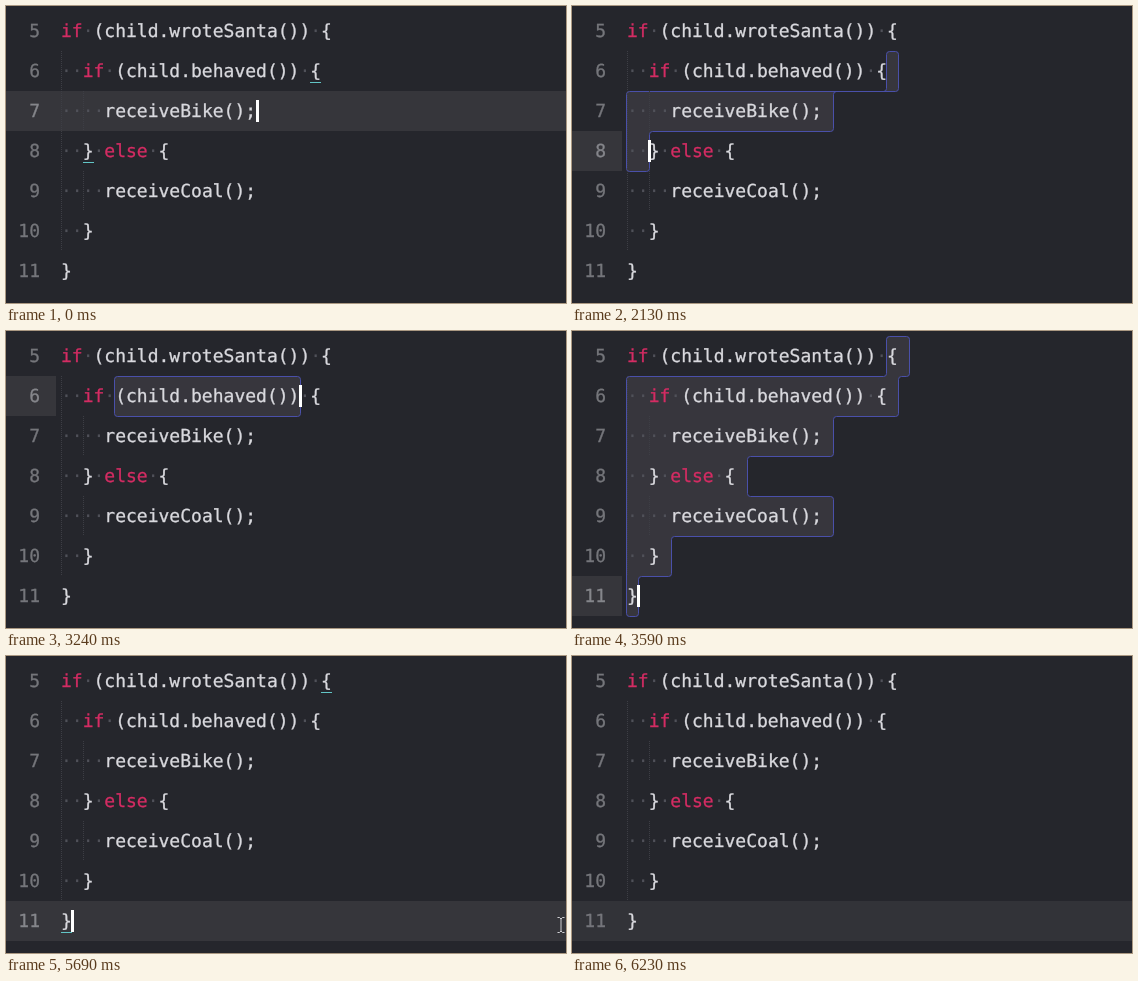
An HTML page that plays this animation: 560 by 297 pixels, repeating every 6270 ms.

```html
<!DOCTYPE html>
<html lang="en">
<head>
<meta charset="utf-8">
<title>Bracket selection</title>
<style>
  html, body { margin: 0; width: 100%; height: 100%; overflow: hidden; background: #25262c; }
  svg { display: block; width: 560px; height: 297px; }
  text {
    font: 18px "DejaVu Sans Mono", monospace;
    text-rendering: geometricPrecision;
    white-space: pre;
    stroke-width: .3px;
  }
  .code { fill: #d9d9de; stroke: #d9d9de; }
  .key { fill: #d42c63; stroke: #d42c63; }
  .dot { fill: #505159; }
  .num { fill: #75767b; stroke: #75767b; }
  .num.on { fill: #85868b; stroke: #85868b; }
  .guide { stroke: #3d3e45; stroke-dasharray: 1 1; }
  .sel { fill: #37363d; stroke: #4a50aa; }
  .line { fill: #36363b; }
  .mark { fill: #62c5c6; }
  .caret { fill: #fff; }
  .beam { fill: none; stroke: #d0d0d4; }
</style>
</head>
<body>
<svg id="stage" viewBox="0 0 560 297"></svg>
<script>
const LOOP = 6270, FIRST = 5, LEFT = 55, TOP = 5, ROW = 40, CHAR = 10.836;
const lines = [
  'if (child.wroteSanta()) {',
  '  if (child.behaved()) {',
  '    receiveBike();',
  '  } else {',
  '    receiveCoal();',
  '  }',
  '}'
];

// Positions are [line number, column]; sel runs from one position to another.
const states = [
  { at: 0, line: 7, wide: true, caret: [7, 18], marks: [[6, 23], [8, 2]] },
  { at: 2130, line: 8, caret: [8, 2], sel: [[6, 24], [8, 2]] },
  { at: 2730, line: 8, caret: [8, 3], sel: [[6, 23], [8, 3]] },
  { at: 3240, line: 6, caret: [6, 22], sel: [[6, 5], [6, 22]] },
  { at: 3590, line: 11, caret: [11, 1], sel: [[5, 24], [11, 1]] },
  { at: 4910, line: 11, wide: true, caret: [11, 1], marks: [[5, 24], [11, 0]] },
  { at: 5690, line: 11, wide: true, caret: [11, 1], marks: [[5, 24], [11, 0]], beam: true },
  { at: 5750, line: 11, wide: true, caret: [11, 1], marks: [[5, 24], [11, 0]] },
  { at: 6230, line: 11, wide: true, idle: true }
];

const stage = document.getElementById('stage');
const colX = c => LEFT + c * CHAR;
const rowY = n => TOP + (n - FIRST) * ROW;

function add(parent, tag, attrs, text) {
  const el = document.createElementNS('http://www.w3.org/2000/svg', tag);
  for (const k in attrs) el.setAttribute(k, attrs[k]);
  if (text) el.textContent = text;
  return parent.appendChild(el);
}
const rect = (parent, cls, x, y, width, height) =>
  add(parent, 'rect', { class: cls, x, y, width, height });

const back = add(stage, 'g', {});
const text = add(stage, 'g', {});
const front = add(stage, 'g', {});

function guide(x, from, to) {
  add(text, 'path', { class: 'guide', d: `M${x} ${rowY(from)}V${rowY(to)}` });
}
guide(55.5, 6, 11);
guide(77.5, 7, 8);
guide(77.5, 9, 10);

const numbers = lines.map((src, i) => {
  const n = FIRST + i, y = rowY(n) + 26;
  for (const m of src.matchAll(/ |\b(?:if|else)\b|[^ ]+/g)) {
    const cls = m[0] === ' ' ? 'dot' : /^(if|else)$/.test(m[0]) ? 'key' : 'code';
    add(text, 'text', { class: cls, x: colX(m.index), y }, m[0] === ' ' ? '·' : m[0]);
  }
  return add(text, 'text', { class: 'num', x: 34, y, 'text-anchor': 'end' }, String(n));
});

// Closed outline with every corner softened.
function outline(points, r = 3) {
  const pts = points.filter((p, i) => {
    const q = points[(i + 1) % points.length];
    return p[0] !== q[0] || p[1] !== q[1];
  });
  const toward = (a, b) => {
    const d = Math.hypot(b[0] - a[0], b[1] - a[1]), k = Math.min(r, d / 2) / d;
    return [a[0] + (b[0] - a[0]) * k, a[1] + (b[1] - a[1]) * k];
  };
  return pts.map((p, i) => {
    const prev = pts[(i + pts.length - 1) % pts.length], next = pts[(i + 1) % pts.length];
    return `${i ? 'L' : 'M'}${toward(p, prev)}Q${p} ${toward(p, next)}`;
  }).join('') + 'Z';
}

function selection([[n0, c0], [n1, c1]]) {
  const startX = Math.round(colX(c0)) - .5, edge = LEFT - .5;
  const pts = [[startX, rowY(n0) + .5]];
  for (let n = n0; n <= n1; n++) {
    const end = n === n1 ? c1 : lines[n - FIRST].length + 1;
    const x = Math.ceil(colX(end)) + .5;
    pts.push([x, rowY(n) + .5], [x, rowY(n + 1) + .5]);
  }
  const bottom = rowY(n1 + 1) + .5;
  if (n0 === n1) pts.push([startX, bottom]);
  else pts.push([edge, bottom], [edge, rowY(n0 + 1) + .5], [startX, rowY(n0 + 1) + .5]);
  add(back, 'path', { class: 'sel', d: outline(pts) });
}

function show(s) {
  back.replaceChildren();
  front.replaceChildren();
  const band = rect(back, 'line', 0, rowY(s.line), s.wide ? 560 : 50, ROW);
  if (s.idle) band.style.fill = '#323338';
  numbers.forEach((el, i) => el.classList.toggle('on', !s.idle && FIRST + i === s.line));
  if (s.sel) selection(s.sel);
  for (const [n, c] of s.marks || []) {
    rect(front, 'mark', Math.round(colX(c)), rowY(n) + 31, 11, 1);
  }
  if (s.caret) {
    const [n, c] = s.caret;
    rect(front, 'caret', Math.floor(colX(c)), rowY(n) + 9, 3, 22);
  }
  if (s.beam) {
    add(front, 'path', {
      class: 'beam',
      d: 'M551.5 261.5h2l1.5 1.5l1.5 -1.5h2M555 263v12M551.5 276.5h2l1.5 -1.5l1.5 1.5h2'
    });
  }
}

let current;
const start = performance.now();
function tick(now) {
  const t = Math.max(0, now - start) % LOOP;
  const s = states.findLast(q => q.at <= t);
  if (s !== current) show(current = s);
  requestAnimationFrame(tick);
}
tick(start);
</script>
</body>
</html>
```
